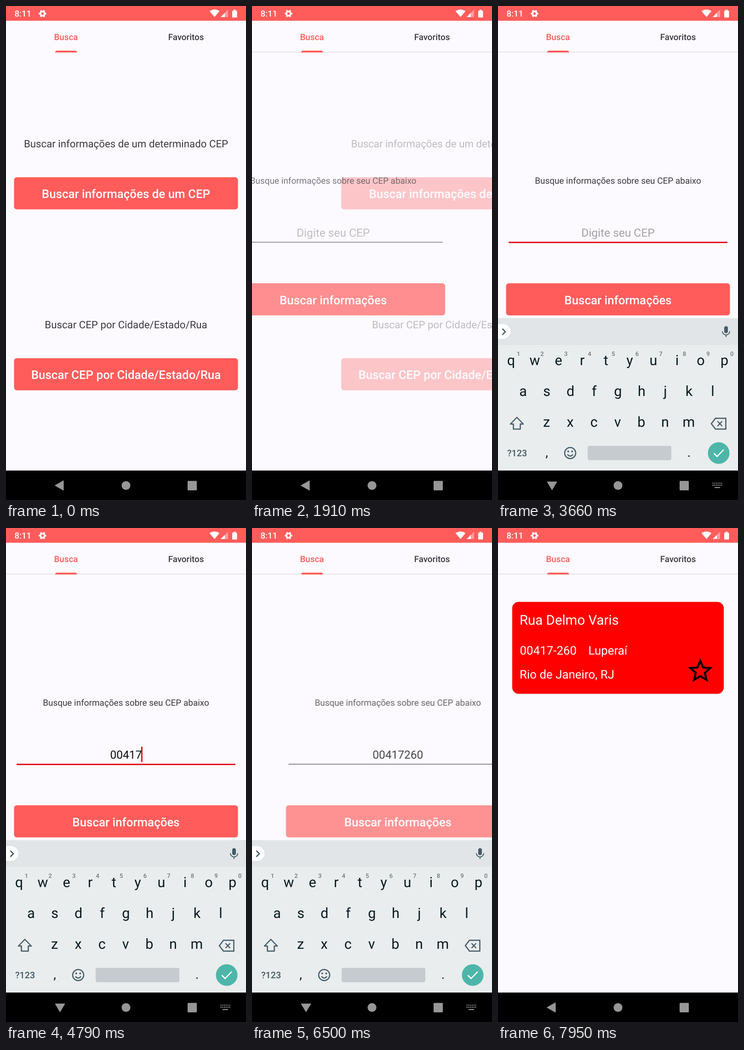
These frames come from a looping animation (522x1073 px, 8000 ms). An HTML page:

```html
<!DOCTYPE html>
<html lang="pt-BR">
<head>
<meta charset="utf-8">
<title>Busca de CEP</title>
<style>
  html, body { margin: 0; width: 100%; height: 100%; overflow: hidden; background: #fcfafe; }
  svg { display: block; width: 522px; height: 1073px; font-family: Roboto, "Noto Sans", sans-serif; text-rendering: geometricPrecision; }
  .mid { text-anchor: middle; }
  .bold { font-weight: 500; }
  .line { fill: none; stroke: #455a64; stroke-width: 2.5; }
</style>
</head>
<body>
<svg viewBox="0 0 522 1073" fill="#3b3840">
  <rect width="522" height="1073" fill="#fcfafe"/>

  <g id="home"></g>

  <g id="search">
    <text class="mid" x="261" y="385.5" font-size="18.95">Busque informações sobre seu CEP abaixo</text>
    <text id="field" class="mid" x="261" y="501" font-size="24.5"></text>
    <rect id="underline" x="23" width="476"/>
    <rect id="caret" y="475" width="3" height="33" fill="#df1116"/>
  </g>

  <g id="result" fill="#fff">
    <rect x="30.5" y="161.5" width="461" height="200" rx="14" fill="#000" opacity=".13"/>
    <rect x="31" y="160.5" width="460" height="199.5" rx="14" fill="#f00"/>
    <text x="47" y="209.5" font-size="29.4">Rua Delmo Varis</text>
    <g font-size="25.9">
      <text x="47.5" y="275">00417-260</text>
      <text x="196.5" y="275">Luperaí</text>
      <text x="47" y="327">Rio de Janeiro, RJ</text>
    </g>
    <path fill="#000" transform="translate(407.6 277.6) scale(2.7)" d="M22 9.24l-7.19-.62L12 2 9.19 8.63 2 9.24l5.46 4.73L5.82 21 12 17.27 18.18 21l-1.63-7.03zM12 15.4l-3.76 2.27 1-4.28-3.32-2.88 4.38-.38L12 6.1l1.71 4.04 4.38.38-3.32 2.88 1 4.28z"/>
  </g>

  <!-- Status bar and tabs -->
  <rect width="522" height="32" fill="#ff5c5b"/>
  <g fill="#fff">
    <text class="bold" x="18.5" y="23" font-size="18.6">8:11</text>
    <g fill="none" stroke="#fff">
      <circle cx="79.5" cy="16.5" r="4.6" stroke-width="3.8"/>
      <circle cx="79.5" cy="16.5" r="6.8" stroke-width="3" pathLength="12" stroke-dasharray="1 1" stroke-dashoffset=".5"/>
    </g>
    <path d="M453.5 24 442.5 11Q453.5 4 464.5 11Z"/>
    <path d="M467 24H483V8Z" opacity=".4"/>
    <path d="M467 24H476V15Z"/>
    <path d="M495 8h4.5v2h1.5q1.5 0 1.5 1.5v12q0 1.5-1.5 1.5h-7.500q-1.500 0-1.500-1.500v-12q0-1.500 1.500-1.500h1.500z"/>
  </g>
  <g class="mid bold" font-size="18.8">
    <text x="130.500" y="74" fill="#ff5c5b">Busca</text>
    <text x="391.500" y="74">Favoritos</text>
  </g>
  <rect id="divider" y="99.300" width="522" height="1.700" fill="#e5e0e8"/>
  <path d="M107 101q0-4 4-4h39.500q4 0 4 4z" fill="#ff5c5b"/>

  <g id="keyboard">
    <rect y="678" width="522" height="332" fill="#e9edee"/>
    <rect y="678" width="522" height="58" fill="#e1e5e7"/>
    <path d="M0 691h11a16 16 0 0 1 0 32H0z" fill="#fff"/>
    <path class="line" d="M9.500 701l6.500 6.500-6.500 6.500"/>
    <rect x="492" y="695.500" width="8" height="15" rx="4" fill="#455a64"/>
    <path class="line" style="stroke-width:2" d="M488 706.500a8 8 0 0 0 16 0M496 714.500v4.500"/>
    <g id="keys" class="mid" fill="#08191f"></g>
    <path class="line" d="M41 893.500 55 908h-6.500v11h-15v-11H27z" stroke-linejoin="round"/>
    <path class="line" d="M473 895.500h22.500v23.500H473l-9-11.750zM477.500 902l10 10.500m0-10.500-10 10.500"/>
    <circle class="line" cx="157" cy="971" r="12"/>
    <path class="line" d="M151 974q6 7 12 0"/>
    <g fill="#455a64"><circle cx="152.700" cy="967.500" r="1.900"/><circle cx="161.300" cy="967.500" r="1.900"/></g>
    <rect x="195" y="955.500" width="182" height="31" rx="4" fill="#c6cbd0"/>
    <circle cx="480" cy="971" r="23.500" fill="#4db6a9"/>
    <path d="M469.500 971.500l7 7 14.500-15" fill="none" stroke="#fff" stroke-width="2.500"/>
  </g>

  <!-- Navigation bar -->
  <rect y="1009" width="522" height="64"/>
  <rect y="1009" width="522" height="64" fill="#000"/>
  <g fill="#979797">
    <path id="back" d="M106.500 1041.500 125 1031v21z" stroke="#979797" stroke-linejoin="round"/>
    <circle cx="261" cy="1041.500" r="9.600"/>
    <rect x="395" y="1031.500" width="20" height="20.500" rx="1.500"/>
    <g id="imeOpen">
      <path d="M107 1033.500h21l-10.500 17.500z" stroke="#979797" stroke-linejoin="round"/>
      <path d="M466.500 1036.500h21m-21 4.300h21" stroke="#979797" stroke-width="2.200" stroke-dasharray="2.200 1.560"/>
      <path d="M471 1046h12" stroke="#979797" stroke-width="2"/>
    </g>
  </g>
</svg>
<script>
const LOOP = 8000;
const CODE = "00417260";
const FIELD_SIZE = 24.5, DIGIT_WIDTH = 0.5617 * FIELD_SIZE;
const SLIDE = 261, SLIDE_MS = 400, KEYBOARD_HEIGHT = 332;
const at = {
  divider: 40, homeRelease: 1650, searchIn: 1665, focus: 2900, keyboardUp: 3100,
  typing: 3800, keyGap: 230, searchRelease: 6330, searchOut: 6378,
  keyboardDown: 6800, result: 7250
};

const $ = id => document.getElementById(id);
const set = (node, attrs) => {
  for (const name in attrs) node.setAttribute(name, attrs[name]);
  return node;
};
const add = (parent, tag, attrs, text = "") => {
  const node = set(document.createElementNS("http://www.w3.org/2000/svg", tag), attrs);
  node.textContent = text;
  return parent.appendChild(node);
};
const show = (id, visible) => { $(id).style.display = visible ? "" : "none"; };
const progress = (t, start, length) => Math.min(1, Math.max(0, (t - start) / length));
const smooth = p => 0.5 - Math.cos(Math.PI * p) / 2;
const quad = p => p < 0.5 ? 2 * p * p : 1 - 2 * (1 - p) ** 2;
const decelerate = p => 1 - (1 - p) ** 2;

function addButton(parent, y, label) {
  const group = add(parent, "g", {});
  add(group, "rect", { x: 17.5, y, width: 487, height: 69.7, rx: 6, fill: "#ff5c5b" });
  add(group, "text", { x: 261, y: y + 45.3, class: "mid bold", "font-size": 25.9, fill: "#fff" }, label);
  return group;
}

function addCaption(y, text) {
  add($("home"), "text", { x: 261, y, class: "mid", "font-size": 22.25 }, text);
}

addCaption(307, "Buscar informações de um determinado CEP");
const homeButton = addButton($("home"), 372, "Buscar informações de um CEP");
addCaption(700, "Buscar CEP por Cidade/Estado/Rua");
addButton($("home"), 765, "Buscar CEP por Cidade/Estado/Rua");
const searchButton = addButton($("search"), 602.3, "Buscar informações");

const STEP = 51.57;
[["qwertyuiop", 28.5, 780], ["asdfghjkl", 54.5, 847], ["zxcvbnm", 105.5, 914]].forEach(([row, x, y]) =>
  [...row].forEach((key, i) => add($("keys"), "text", { x: x + i * STEP, y, "font-size": 30.5 }, key)));
for (let i = 0; i < 10; i++) {
  add($("keys"), "text", { x: 44.5 + i * STEP, y: 759.5, "font-size": 13, class: "bold", fill: "#6d787d" }, (i + 1) % 10);
}
add($("keys"), "text", { x: 41.5, y: 978, "font-size": 19.7, class: "bold", fill: "#455a64" }, "?123");
add($("keys"), "text", { x: 106, y: 979, "font-size": 28 }, ",");
add($("keys"), "text", { x: 415.5, y: 979, "font-size": 28 }, ".");

function placePage(id, x, opacity) {
  set($(id), { transform: `translate(${x})`, opacity });
  show(id, opacity > 0);
}

// A touched button fades towards 0.2, then back to full on release.
function pressOpacity(t, release) {
  return t < release
    ? 1 - 0.8 * quad(progress(t, release - 150, 150))
    : 0.2 + 0.8 * quad(progress(t, release, 250));
}

function drawField(t) {
  const focused = t >= at.focus && t < at.searchRelease;
  const count = t < at.typing ? 0 : Math.min(CODE.length, 1 + Math.floor((t - at.typing) / at.keyGap));
  const lastInput = count ? at.typing + (count - 1) * at.keyGap : at.focus;
  $("field").textContent = count ? CODE.slice(0, count) : "Digite seu CEP";
  set($("field"), { fill: count ? "#0c0c10" : "#a4a2a6" });
  set($("underline"), focused
    ? { y: 512, height: 3, fill: "#df1116" }
    : { y: 512.2, height: 1.6, fill: "#4c4a52" });
  set($("caret"), { x: 260.5 + count * DIGIT_WIDTH / 2 - (count ? 1 : 0) });
  show("caret", focused && (t - lastInput) % 1000 < 500);
}

function draw(t) {
  const enter = smooth(progress(t, at.searchIn, SLIDE_MS));
  const leave = smooth(progress(t, at.searchOut, SLIDE_MS));
  placePage("home", SLIDE * enter, 1 - enter);
  placePage("search", SLIDE * (enter - 1 + leave), enter * (1 - leave));
  set(homeButton, { opacity: pressOpacity(t, at.homeRelease) });
  set(searchButton, { opacity: pressOpacity(t, at.searchRelease) });
  drawField(t);

  const raised = decelerate(progress(t, at.keyboardUp, 220)) - progress(t, at.keyboardDown, 200) ** 2;
  set($("keyboard"), { transform: `translate(0 ${KEYBOARD_HEIGHT * (1 - raised)})` });
  show("keyboard", raised > 0);

  const imeOpen = t >= at.focus && t < at.keyboardDown;
  show("imeOpen", imeOpen);
  show("back", !imeOpen);
  show("divider", t >= at.divider);
  show("result", t >= at.result);
}

const start = performance.now();
function tick() {
  draw((performance.now() - start) % LOOP);
  requestAnimationFrame(tick);
}
draw(0);
requestAnimationFrame(tick);
</script>
</body>
</html>
```
